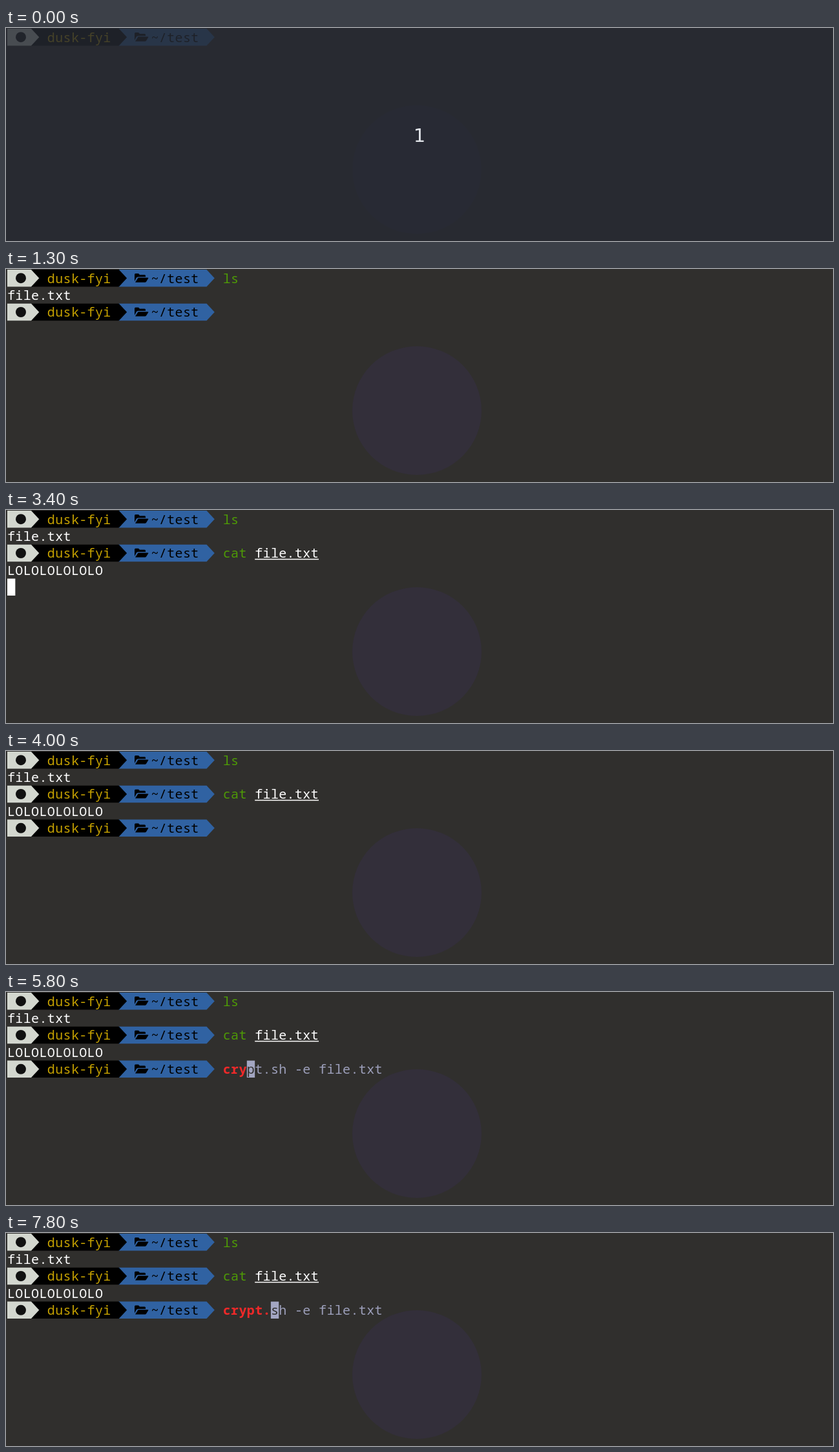
An HTML page that plays this animation: 1280 by 331 pixels, repeating every 8 s.

```html
<!DOCTYPE html>
<html lang="en">
<head>
<meta charset="utf-8">
<title>Terminal session</title>
<style>
  html, body { margin: 0; width: 100%; height: 100%; overflow: hidden; background: #302f2d; }
  svg { display: block; width: 1280px; height: 331px; }
  text {
    font: 20px "Noto Sans Mono", "DejaVu Sans Mono", monospace;
    letter-spacing: .36px;
    white-space: pre;
    fill: #fff;
  }
  .host { fill: #c4a000; }
  .path { fill: #000; }
  .known { fill: #4e9a06; }
  .unknown { fill: #ef2929; font-weight: bold; }
  .ghost { fill: #9c9fba; }
  .under { fill: #302f2d; }
  .count { font: 29px "DejaVu Sans", sans-serif; letter-spacing: 0; fill: #e0e3e8; text-anchor: middle; }
</style>
</head>
<body>
<svg viewBox="0 0 1280 331">
  <defs>
    <g id="prompt">
      <path fill="#3062a2" d="M174 0H310.5L322.8 13.2L310.5 26.4H174Z"/>
      <path fill="#000" d="M38 0H174.8L187.1 13.2L174.8 26.4H38Z"/>
      <path fill="#d3d7cf" d="M2 0H39L51.3 13.2L39 26.4H2Z"/>
      <circle cx="23" cy="13.2" r="8" fill="#111"/>
      <path fill="#000" d="M199 18V7.5q0-1.5 1.5-1.5h4.5l2 2h7.5q1.5 0 1.5 1.5v1.8h-11.5q-2 0-3 1.8z
        M204.6 12.6h15q1.2 0 .6 1l-3.2 5.2q-.6 1-2 1h-15z"/>
      <text class="host" x="63.8" y="20.5">dusk-fyi</text>
      <text class="path" x="224.5" y="20.5">~/test</text>
    </g>
  </defs>
  <rect width="1280" height="331" fill="#302f2d"/>
  <circle cx="636" cy="220" r="100" fill="#332f3a"/>
  <g id="term"></g>
  <rect id="veil" width="1280" height="331" fill="#262a33"/>
  <text class="count" id="count" x="640" y="177">1</text>
</svg>
<script>
const LOOP = 8000, CELL = 12.36, ROW = 26.4, LEFT = 2, TOP = 1, INPUT_COL = 27;
const history = [['ls', 'file.txt'], ['cat file.txt', 'LOLOLOLOLOLO']];
const oldCat = 'cat file.txt out.ecrypt';
const crypt = 'crypt.sh -e file.txt';

// [time, finished commands, input (null while running), suggestion, cursor shown]
const steps = [
  [0, 0, '', '', false],
  [500, 0, '', '', true],
  [700, 1, null, '', true],
  [800, 1, '', '', true],
  [1300, 1, '', '', false],
  [1800, 1, 'c', oldCat, true],
  [1900, 1, 'ca', oldCat, true],
  [2000, 1, 'cat', oldCat, true],
  [2200, 1, 'cat ', oldCat, true],
  [2700, 1, 'cat fi', oldCat, true],
  [2800, 1, 'cat fil', oldCat, true],
  [3000, 1, 'cat file.txt ', oldCat, true],
  [3400, 2, null, '', true],
  [3500, 2, '', '', true],
  [4000, 2, '', '', false],
  [5000, 2, '', '', true],
  [5200, 2, '', '', false],
  [5400, 2, 'c', 'cat file.txt', true],
  [5500, 2, 'cr', crypt, true],
  [5800, 2, 'cry', crypt, true],
  [6300, 2, 'crypt', crypt, true],
  [6600, 2, 'crypt;', '', true],
  [6900, 2, 'crypt', crypt, true],
  [7300, 2, 'crypt;', '', true],
  [7600, 2, 'crypt', crypt, true],
  [7800, 2, 'crypt.', crypt, true]
];

const colX = col => LEFT + col * CELL;
const rowY = row => TOP + row * ROW;
const text = (col, row, str, kind = '') =>
  `<text class="${kind}" x="${colX(col)}" y="${rowY(row) + 20.5}">${str}</text>`;
const box = (col, row, len, dy, h, fill) =>
  `<rect x="${colX(col)}" y="${rowY(row) + dy}" width="${len * CELL}" height="${h}" fill="${fill}"/>`;
const prompt = row => `<use href="#prompt" y="${rowY(row)}"/>`;

function command(row, input) {
  const name = input.match(/^[^ ;]*/)[0];
  const rest = input.slice(name.length);
  const arg = rest.trim();
  const restCol = INPUT_COL + name.length;
  let out = text(INPUT_COL, row, name, /^(ls|cat)$/.test(name) ? 'known' : 'unknown');
  out += text(restCol, row, rest);
  if (arg && arg !== ';') out += box(restCol + 1, row, arg.length, 22, 1.5, '#fff');
  return out;
}

function screen([, done, input, suggestion, cursor]) {
  let out = '';
  history.slice(0, done).forEach(([cmd, reply], i) => {
    out += prompt(2 * i) + command(2 * i, cmd) + text(0, 2 * i + 1, reply);
  });
  const row = 2 * done;
  if (input === null) return out + box(0, row, 1, 0, ROW, '#fff');

  const col = INPUT_COL + input.length;
  const ghost = suggestion.slice(input.length);
  out += prompt(row) + command(row, input) + text(col + 1, row, ghost.slice(1), 'ghost');
  if (cursor) out += box(col, row, 1, 0, ROW, ghost ? '#a3a6c2' : '#fff');
  return out + text(col, row, ghost.slice(0, 1), 'under');
}

const term = document.getElementById('term');
const veil = document.getElementById('veil');
const count = document.getElementById('count');
let shown = null;

function draw(now) {
  const t = now % LOOP;
  const step = steps.filter(s => s[0] <= t).pop();
  if (step !== shown) {
    term.innerHTML = screen(step);
    shown = step;
  }
  veil.setAttribute('opacity', t < 400 ? 0.8 : t < 500 ? 0.4 : 0);
  count.setAttribute('opacity', t < 400 ? 1 : 0);
}

function tick() {
  draw(performance.now());
  requestAnimationFrame(tick);
}
tick();
</script>
</body>
</html>
```
